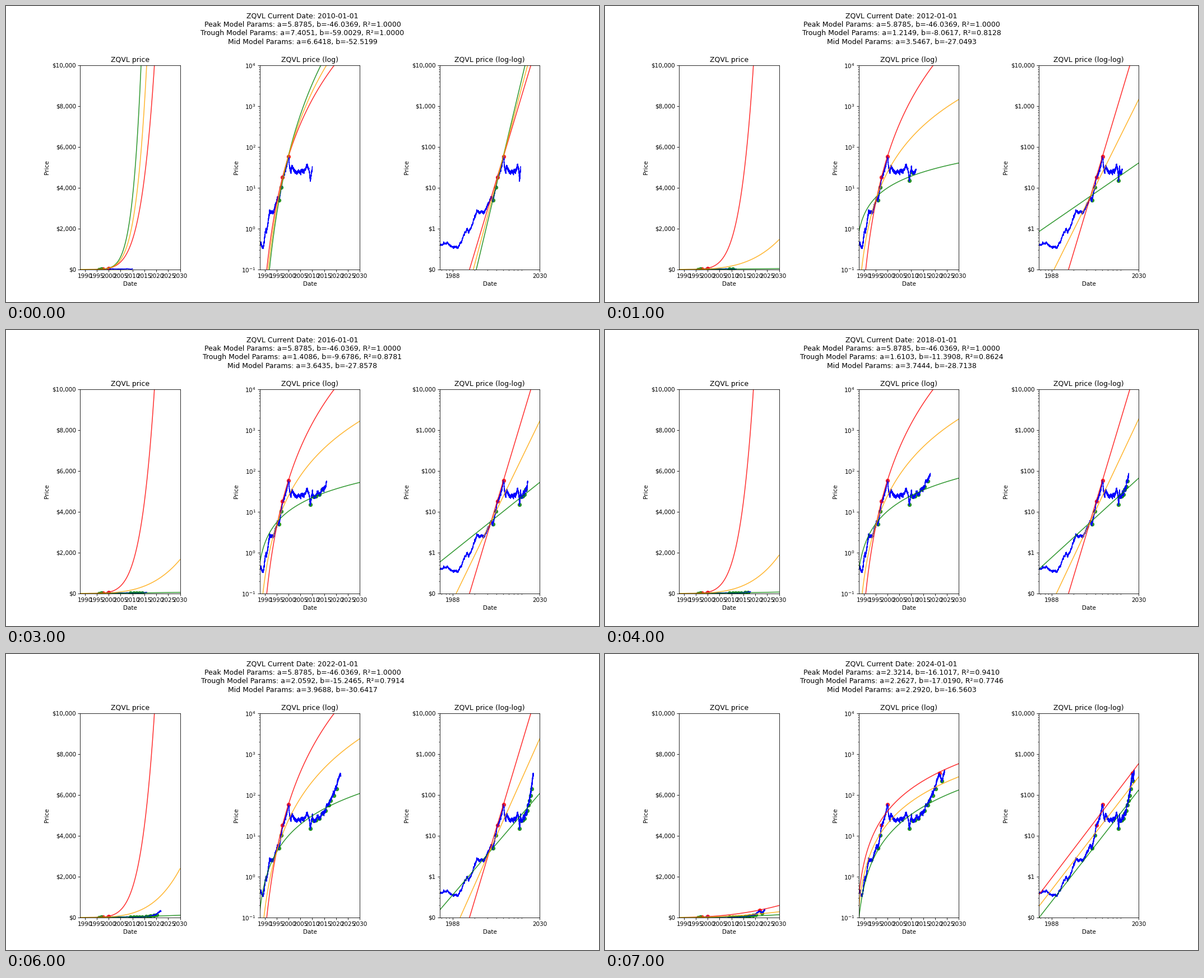
Recreate the animation shown at these times as a matplotlib script. Size 1058 by 529 pixels, loop 8 s.

```python
import numpy as np
import matplotlib.pyplot as plt
from matplotlib.animation import FuncAnimation
from matplotlib.ticker import FuncFormatter, LogLocator, NullFormatter

HEIGHT = 529
NAME = "ZQVL"
LISTED = 1986.195              # decimal year of day zero
START, END = 1988, 2030
YEARS = range(2010, 2026, 2)
LAG = 1.05                     # years until an extreme counts as confirmed

plt.rcParams["font.family"] = "DejaVu Sans"

# Key points of the price: year, price
PEAKS = [(1997.5, 18.29), (1999.98, 58.69), (2021.9, 340)]
BRIEF_PEAK = (2018.77, 114)    # dropped once the price has overtaken it
TROUGHS = [(1996.02, 5.01), (1997.0, 10.13), (2009.18, 15.15), (2010.5, 23),
           (2011.65, 24.2), (2013.0, 26.4), (2014.07, 34.8), (2015.65, 40.5),
           (2016.85, 56.5), (2017.65, 73), (2018.98, 97), (2020.22, 140),
           (2022.85, 216)]
TURNS = [(1988.0, .39), (1988.5, .45), (1988.9, .345), (1989.4, .34), (1990.5, 1.0),
         (1990.75, .8), (1992.05, 2.55), (1993.6, 2.5), (1995.55, 5.9), (1998.75, 26),
         (2000.4, 34), (2000.97, 23), (2001.45, 34), (2002.6, 24.5), (2006.45, 25),
         (2007.85, 35), (2008.6, 27), (2010.0, 30), (2012.2, 31), (2016.0, 54),
         (2020.0, 160), (2020.65, 218), (2024.0, 380)]


def days(year):
    return (np.asarray(year) - LISTED) * 365.25


def price_history():
    key_year, key_price = np.array(sorted(PEAKS + [BRIEF_PEAK] + TROUGHS + TURNS)).T
    year = np.linspace(START, 2024, 36 * 252)
    rng = np.random.default_rng(12)
    memory = 0.93 ** np.arange(100)
    noise = np.convolve(rng.normal(0, 0.018, year.size), memory)[:year.size]
    return year, np.exp(np.interp(year, key_year, np.log(key_price)) + noise)


def fit_power_law(points):
    """Return a, b of ln(price) = a * ln(days) + b, and R²."""
    year, price = np.array(points).T
    x, y = np.log(days(year)), np.log(price)
    a, b = np.polyfit(x, y, 1)
    return a, b, np.corrcoef(x, y)[0, 1] ** 2


def dollars(value, _):
    return f"${value:,.0f}"


class Panel:
    """One axes with the price, the three models and their fitted points."""

    def __init__(self, ax, title, to_x):
        self.to_x = to_x
        self.price, = ax.plot([], [], color="blue", lw=1.5)
        self.models = [ax.plot([], [], color=c, lw=1.5, alpha=0.8)[0]
                       for c in ("red", "green", "orange")]
        self.dots = [ax.scatter([], [], color=c, alpha=0.8) for c in ("red", "green")]
        ax.set_title(title)
        ax.set_xlabel("Date")
        ax.set_ylabel("Price")

    def show(self, price, curves, extremes):
        self.price.set_data(self.to_x(price[0]), price[1])
        for line, curve in zip(self.models, curves):
            line.set_data(self.to_x(grid), curve)
        for dots, points in zip(self.dots, extremes):
            year, value = np.array(points).T
            dots.set_offsets(np.column_stack([self.to_x(year), value]))


fig, (ax_lin, ax_log, ax_loglog) = plt.subplots(1, 3, figsize=(14.107, 7.0535), dpi=75)
fig.subplots_adjust(left=0.125, right=0.9, bottom=0.11, top=0.8, wspace=0.8)

panels = [Panel(ax_lin, f"{NAME} price", np.asarray),
          Panel(ax_log, f"{NAME} price (log)", np.asarray),
          Panel(ax_loglog, f"{NAME} price (log-log)", days)]

for ax in (ax_lin, ax_log):
    ax.set_xlim(START, END)
    ax.set_xticks(range(1990, END + 1, 5))
ax_lin.set_ylim(0, 10000)
for ax in (ax_log, ax_loglog):
    ax.set_yscale("log")
    ax.set_ylim(0.1, 10000)
for ax in (ax_lin, ax_loglog):
    ax.yaxis.set_major_formatter(FuncFormatter(dollars))

ax_loglog.set_xscale("log")
ax_loglog.set_xlim(days(START), days(END))
ax_loglog.set_xticks([1000, float(days(END))], labels=["1988", "2030"])
ax_loglog.xaxis.set_minor_locator(LogLocator(subs=range(2, 10)))
ax_loglog.xaxis.set_minor_formatter(NullFormatter())

header = [fig.text(0.5, 1 - y / HEIGHT, "", fontsize=12, ha="center", va="baseline")
          for y in np.linspace(21, 68, 4)]

grid = np.linspace(START, END, 800)
history_year, history_price = price_history()


def update(frame):
    now = YEARS[frame]
    peaks, troughs = ([p for p in points if p[0] + LAG <= now]
                      for points in (PEAKS, TROUGHS))
    if LAG <= now - BRIEF_PEAK[0] < 3:
        peaks.append(BRIEF_PEAK)

    peak, trough = fit_power_law(peaks), fit_power_law(troughs)
    mid = [(p + t) / 2 for p, t in zip(peak, trough)]
    curves = [np.exp(a * np.log(days(grid)) + b) for a, b, _ in (peak, trough, mid)]
    past = history_year <= now
    for panel in panels:
        panel.show((history_year[past], history_price[past]), curves, (peaks, troughs))

    lines = [f"{NAME} Current Date: {now}-01-01"]
    for label, (a, b, r2) in (("Peak", peak), ("Trough", trough)):
        lines.append(f"{label} Model Params: a={a:.4f}, b={b:.4f}, R²={r2:.4f}")
    lines.append(f"Mid Model Params: a={mid[0]:.4f}, b={mid[1]:.4f}")
    for text, line in zip(header, lines):
        text.set_text(line)
    return header


anim = FuncAnimation(fig, update, frames=len(YEARS), interval=1000,
                     repeat=True, repeat_delay=0, blit=False)
plt.show()
```
